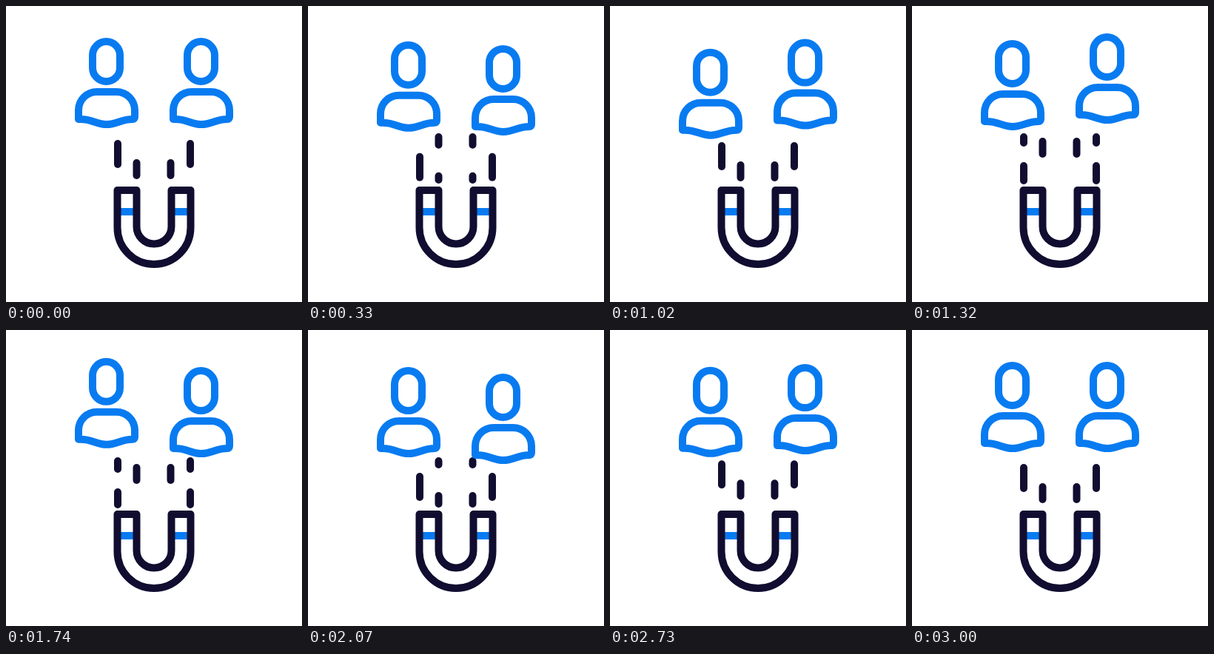
These frames come from a looping animation (400 px wide and 400 px high, 3090 ms). An HTML page:

```html
<!DOCTYPE html>
<html lang="en">
<head>
<meta charset="utf-8">
<title>Magnet attracting people</title>
<style>
  html, body { margin: 0; width: 100%; height: 100%; overflow: hidden; background: #fff; }
  svg { display: block; width: 100vw; height: 100vh; fill: none; stroke-width: 10; stroke-linecap: round; stroke-linejoin: round; }
  .blue { stroke: #087bf1; }
  .dark { stroke: #100d30; }
  .outer { stroke-dasharray: 28 31; }
  .inner { stroke-dasharray: 17 42; }
</style>
</head>
<body>
<svg viewBox="0 0 400 400">
  <defs>
    <g id="person">
      <rect x="117" y="48" width="37" height="54" rx="18.5"/>
      <path d="M98 153V141C98 127 109 116 123 116H149C163 116 174 127 174 141V150Q174 153 171 153C155 153 150 160 136 160S117 153 101 153Z"/>
    </g>
  </defs>
  <g class="dark">
    <path class="outer" d="M151 177V236"/>
    <path class="outer" d="M249 177V236"/>
    <path class="inner" d="M176.5 177V235"/>
    <path class="inner" d="M222.5 177V235"/>
  </g>
  <path class="blue" stroke-linecap="butt" d="M153 278H175M225 278H247"/>
  <path class="dark" d="M150.5 249H176.5V298A23.5 23.5 0 0 0 223.5 298V249H249.5V299.5A49.5 49.5 0 0 1 150.5 299.5Z"/>
  <g class="blue">
    <g id="left"><use href="#person"/></g>
    <g id="right"><use href="#person"/></g>
  </g>
</svg>
<script>
const LOOP = 3090, END = 3000, STEP = 30;
const leftKeys = [[0, 0], [900, 16], [1650, -6], [2400, 16], [END, 0]];
const rightKeys = [[0, 0], [570, 16], [1320, -6], [2070, 16], [END, 0]];
// Distance travelled by the dashes: four pattern lengths per loop
const flowKeys = [[0, 0], [690, 39], [1320, 89], [1740, 151], [2070, 189], [2490, 221], [END, 236]];

const left = document.getElementById("left");
const right = document.getElementById("right");
const outer = document.querySelectorAll(".outer");
const inner = document.querySelectorAll(".inner");

function segment(keys, t) {
  let i = 0;
  while (i < keys.length - 2 && t >= keys[i + 1][0]) i++;
  return i;
}

function bob(keys, t) {
  const i = segment(keys, t), [t0, a] = keys[i], [t1, b] = keys[i + 1];
  return a + (b - a) * (1 - Math.cos(Math.PI * (t - t0) / (t1 - t0))) / 2;
}

function slope(keys, i) {
  if (i === keys.length - 1) return 0;
  const p = keys[Math.max(i - 1, 0)], n = keys[i + 1];
  return (n[1] - p[1]) / (n[0] - p[0]);
}

// Smooth curve through the keys
function glide(keys, t) {
  const i = segment(keys, t), [t0, a] = keys[i], [t1, b] = keys[i + 1];
  const d = t1 - t0, s = (t - t0) / d, r = 1 - s;
  return r * r * (1 + 2 * s) * a + s * s * (1 + 2 * r) * b
    + s * r * d * (r * slope(keys, i) - s * slope(keys, i + 1));
}

function draw(now) {
  const t = Math.min(Math.floor(now % LOOP / STEP) * STEP, END);
  left.setAttribute("transform", `translate(0 ${bob(leftKeys, t)})`);
  right.setAttribute("transform", `translate(128 ${bob(rightKeys, t)})`);
  const flow = glide(flowKeys, t) % 59;
  for (const line of outer) line.style.strokeDashoffset = 59 - 9 - flow;
  for (const line of inner) line.style.strokeDashoffset = 59 - 35 - flow;
}

const start = performance.now();
function tick() {
  draw(performance.now() - start);
  requestAnimationFrame(tick);
}
tick();
</script>
</body>
</html>
```
